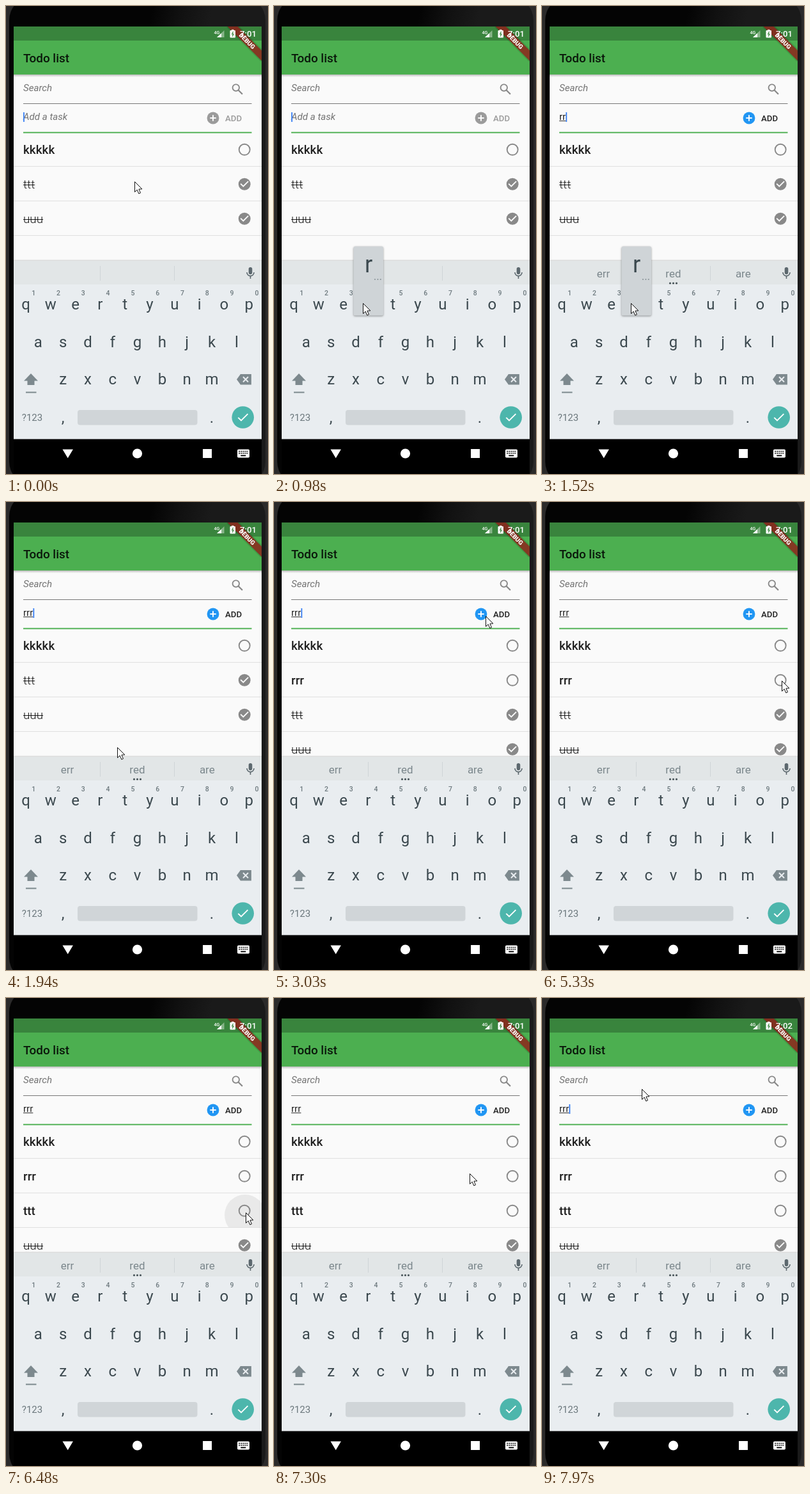
Recreate the animation shown at these times as an HTML page with a canvas. Size 410 by 731 pixels, loop 8 s.

```html
<!DOCTYPE html>
<html lang="en">
<head>
<meta charset="utf-8">
<title>Todo list</title>
<style>
html, body { margin: 0; width: 100%; height: 100%; overflow: hidden; background: #000; }
canvas { display: block; width: 410px; height: 731px; }
</style>
</head>
<body>
<canvas id="stage" width="410" height="731"></canvas>
<script>
const ctx = document.getElementById('stage').getContext('2d');
const LOOP = 8000, STEP = 137.3, LEAD = 30;
const DP = .944;
const LEFT = 12, WIDE = 388, MARGIN = 27, FIELD = 357.5;
const ROW = 54, KEY_X = 38.8, KEY_Y = 58.8;
const INK = 'rgba(0,0,0,.87)', HINT = 'rgba(0,0,0,.54)', ICON = '#898989', OFF = '#9b9b9b';
const GREEN = '#4caf50', STATUS = '#39843d', PAPER = '#fafafa';
const KEY = '#3b484e', KEY_ICON = '#7d898e', BOARD = '#e9edf0';

// Steps at which things happen
const TYPED = [8, 10, 12], ADDED = 21, UNCHECKED = 46, NEXT_MINUTE = 55;

// Each pointer move eases to a place and rests there
const home = { x: 201, y: 274 };
const moves = [
  { from: 0, to: 5, x: 147, y: 487 },
  { from: 5, to: 7, x: 139, y: 464 },
  { from: 12, to: 14, x: 174, y: 383 },
  { from: 14, to: 17, x: 337, y: 201 },
  { from: 17, to: 19, x: 331, y: 178 },
  { from: 24, to: 28, x: 318, y: 294 },
  { from: 28, to: 29, x: 381, y: 281 },
  { from: 30, to: 39, x: 375, y: 279 },
  { from: 39, to: 42, x: 375, y: 335 },
  { from: 50, to: 58, x: 156, y: 142 }
];

const clamp = v => Math.min(1, Math.max(0, v));
const ease = f => f * f * (3 - 2 * f);

function pointerAt(step) {
  return moves.reduce((p, m) => {
    const f = ease(clamp((step - m.from) / (m.to - m.from)));
    return { x: p.x + (m.x - p.x) * f, y: p.y + (m.y - p.y) * f };
  }, home);
}

function rect(x, y, w, h, color) {
  ctx.fillStyle = color;
  ctx.fillRect(x, y, w, h);
}

function round(x, y, w, h, r, color) {
  ctx.fillStyle = color;
  ctx.beginPath();
  ctx.roundRect(x, y, w, h, r);
  ctx.fill();
}

function disc(x, y, r, color) {
  ctx.fillStyle = color;
  ctx.beginPath();
  ctx.arc(x, y, r, 0, Math.PI * 2);
  ctx.fill();
}

function arc(x, y, r, width, color, end = Math.PI * 2) {
  ctx.strokeStyle = color;
  ctx.lineWidth = width;
  ctx.beginPath();
  ctx.arc(x, y, r, 0, end);
  ctx.stroke();
}

function poly(points, color) {
  ctx.beginPath();
  points.forEach(p => ctx.lineTo(...p));
  ctx.closePath();
  ctx.fillStyle = color;
  ctx.fill();
}

function line(points, width, color) {
  ctx.beginPath();
  points.forEach(p => ctx.lineTo(...p));
  ctx.lineWidth = width;
  ctx.strokeStyle = color;
  ctx.stroke();
}

// Isosceles triangle on a level base; a negative height points down
function triangle(cx, base, w, h, color) {
  poly([[cx - w / 2, base], [cx + w / 2, base], [cx, base - h]], color);
}

// Check mark around its lower corner, with 45° legs
function check(x, y, short, long, color) {
  line([[x - short, y - short], [x, y], [x + long, y - long]], 1.9, color);
}

function dots(cx, y, gap, r, color) {
  for (let i = -1; i <= 1; i++) disc(cx + i * gap, y, r, color);
}

function text(str, x, y, size, color, style = '400', align = 'left') {
  ctx.font = `${style} ${size}px Roboto, sans-serif`;
  ctx.textAlign = align;
  ctx.fillStyle = color;
  ctx.fillText(str, x, y);
  return ctx.measureText(str).width;
}

function spread(items, x, y, gap, size, color, style = '400') {
  [...items].forEach((item, i) => text(item, x + i * gap, y, size, color, style, 'center'));
}

function fade(x0, y0, x1, y1, ...colors) {
  const g = ctx.createLinearGradient(x0, y0, x1, y1);
  colors.forEach((c, i) => g.addColorStop(i / (colors.length - 1), c));
  return g;
}

function clipTo(x, y, w, h, drawInside) {
  ctx.save();
  ctx.beginPath();
  ctx.rect(x, y, w, h);
  ctx.clip();
  drawInside();
  ctx.restore();
}

function drawPhone() {
  rect(0, 0, 410, 731, '#2b2a2a');
  round(5, -14, 401, 762, 36, fade(230, 0, 320, 20, '#040404', '#111', '#1a1a1a'));
  rect(LEFT, 32, WIDE, 645, PAPER);
}

function drawRibbon() {
  ctx.translate(LEFT + WIDE, 32);
  ctx.scale(DP, DP);
  ctx.rotate(Math.PI / 4);
  rect(-40, 26, 80, 16, 'rgba(0,0,0,.12)');
  rect(-40, 28, 80, 12, 'rgba(0,0,0,.3)');
  rect(-40, 28, 80, 12, 'rgba(183,28,28,.63)');
  text('DEBUG', 0, 37.6, 10.2, '#fff', '900', 'center');
}

function drawStatus(step) {
  text('4G', 325.5, 44, 7, '#fff', '500');
  poly([[341.5, 38], [341.5, 49], [330, 49]], 'rgba(255,255,255,.4)');
  poly([[337, 42.5], [337, 49], [330, 49]], '#fff');
  round(350.5, 38, 8.5, 11.5, 1, '#fff');
  rect(353, 36.8, 3.5, 2, '#fff');
  line([[355.5, 40], [353.7, 43.8], [356, 43.8], [354.2, 47.5]], 1.2, STATUS);
  text(step < NEXT_MINUTE ? '7:01' : '7:02', 392, 48, 13.2, '#fff', '500', 'right');
}

function drawHeader(step) {
  rect(LEFT, 107, WIDE, 4, fade(0, 107, 0, 111, 'rgba(0,0,0,.25)', 'rgba(0,0,0,0)'));
  rect(LEFT, 54, WIDE, 53, GREEN);
  rect(LEFT, 32, WIDE, 22, STATUS);
  text('Todo list', MARGIN, 88, 20 * DP, INK, '500');
  clipTo(LEFT, 32, WIDE, 75, drawRibbon);
  drawStatus(step);
}

function drawFields(step, typed, caretOn) {
  text('Search', MARGIN, 133, 16 * DP, HINT, 'italic 400');
  arc(359.8, 127.6, 5.2, 1.9, ICON);
  line([[363.5, 131.3], [370, 137.8]], 2.2, ICON);
  rect(MARGIN, 152, FIELD, 1, '#777');

  let caretX = MARGIN;
  if (typed) {
    const w = text(typed, MARGIN, 177.6, 16 * DP, INK);
    rect(MARGIN, 179, w, .9, INK);
    caretX += w;
  } else {
    text('Add a task', MARGIN, 178, 16 * DP, HINT, 'italic 400');
  }
  if (caretOn) rect(caretX, 166, 1.9, 15, '#4285f4');
  rect(MARGIN, 196.7, FIELD, 1.9, GREEN);

  disc(324, 175, 10 * DP, step < TYPED[0] ? OFF : '#2196f3');
  rect(319.3, 174, 9.4, 1.9, '#fff');
  rect(323, 170.3, 1.9, 9.4, '#fff');
  text('ADD', 343, 180, 14 * DP, step <= TYPED[0] ? OFF : INK, '500');
}

function drawRow(label, done, index) {
  const x = 373.2, cy = 224.3 + index * ROW;
  const w = text(label, MARGIN, cy + 6.7, 20 * DP, INK, done ? '300' : '500');
  if (done) {
    rect(MARGIN, cy + .7, w, 1, INK);
    disc(x, cy, 10 * DP, ICON);
    check(x - 1.9, cy + 3.4, 4.1, 7.8, PAPER);
  } else {
    arc(x, cy, 9 * DP, 1.9, ICON);
  }
  rect(LEFT, 250 + index * ROW, WIDE, 1, '#e0e0e0');
}

function drawRipple(step) {
  const age = step - UNCHECKED + 1;
  if (age < 0) return;
  const alpha = .065 * clamp((5 - age) / 2);
  clipTo(LEFT, 305, WIDE, 53, () =>
    disc(374, 339, Math.min(32, 14 + age * 9), `rgba(0,0,0,${alpha})`));
}

function drawList(step) {
  const rows = [['kkkkk', false], ['ttt', step < UNCHECKED], ['uuu', true]];
  if (step >= ADDED) rows.splice(1, 0, ['rrr', false]);
  clipTo(LEFT, 199, WIDE, 199, () => {
    drawRipple(step);
    rows.forEach(([label, done], i) => drawRow(label, done, i));
  });
}

function drawSuggestions(step) {
  const mic = '#5c686e';
  rect(LEFT, 396, WIDE, 2, fade(0, 396, 0, 398, 'rgba(0,0,0,.03)', 'rgba(0,0,0,.15)'));
  rect(LEFT, 398, WIDE, 37, '#e2e6e7');
  [147, 263].forEach(x => rect(x, 406, 1, 23, '#cfd5d7'));
  if (step >= TYPED[0]) {
    spread(['err', 'red', 'are'], 96, 424, 109.4, 18 * DP, '#7b878c');
    dots(205.5, 433, 5, 1.6, '#455157');
  }
  round(379.7, 408, 5.6, 11, 2.8, mic);
  arc(382.5, 416, 5.6, 1.6, mic, Math.PI);
  rect(381.7, 421, 1.6, 5, mic);
}

function drawKeyboard() {
  rect(LEFT, 435, WIDE, 242, BOARD);
  ['qwertyuiop', 'asdfghjkl', 'zxcvbnm'].forEach((keys, i) =>
    spread(keys, 31 + KEY_X * [0, .5, 1.5][i], 473.8 + KEY_Y * i, KEY_X, 24, KEY));
  spread('1234567890', 43.2, 452, KEY_X, 10.5, '#6d797e', '500');

  triangle(39, 585.5, 22, 11.5, KEY_ICON);
  rect(33.5, 585, 11, 7, KEY_ICON);
  rect(31, 602.5, 16.5, 2, KEY_ICON);

  poly([[361, 583.2], [367, 575], [367, 591.5]], KEY_ICON);
  rect(366.9, 575, 17, 16.5, KEY_ICON);
  [-4, 4].forEach(d => line([[375 - d, 579.2], [375 + d, 587.2]], 2, BOARD));

  text('?123', 41, 648, 15, '#6b777c', '400', 'center');
  spread(',.', 89, 651, KEY_X * 6, 24, KEY);
  round(112, 631, 187.5, 23.5, 4, '#d0d5d8');
  disc(370.7, 642.5, 17.3, '#4db6ac');
  check(368, 647.5, 4.7, 10.4, '#fff');
}

function drawNav() {
  rect(LEFT, 676.5, WIDE, 55, '#000');
  triangle(96.7, 692.5, 16.5, -13.8, '#fff');
  disc(205.5, 699, 7.6, '#fff');
  rect(308, 692, 14, 14, '#fff');
  round(362, 692.5, 19, 13, 1.8, '#fff');
  for (let i = 0; i < 10; i++)
    rect(364.3 + i % 5 * 3, 694.8 + Math.floor(i / 5) * 3, 1.7, 1.7, '#000');
  rect(367.3, 701.4, 8, 1.8, '#000');
}

function drawKeyPopup() {
  ctx.save();
  ctx.shadowColor = 'rgba(0,0,0,.4)';
  ctx.shadowBlur = 3;
  ctx.shadowOffsetY = 1;
  round(124.5, 375.5, 46.5, 108, 2.5, '#cfd4d7');
  ctx.restore();
  text('r', 148, 415.5, 36, KEY, '400', 'center');
  dots(162.4, 427, 4.4, 1.1, '#8b959a');
}

function drawPointer({ x, y }) {
  ctx.save();
  ctx.translate(Math.round(x) + .5, Math.round(y) + .5);
  poly([[0, 0], [0, 16], [3.7, 12.6], [6.3, 18.6], [9, 17.4], [6.4, 11.6], [11.4, 11.4]], '#fff');
  ctx.lineWidth = 1;
  ctx.strokeStyle = '#111';
  ctx.stroke();
  ctx.restore();
}

function draw(time) {
  const step = Math.floor((time + LEAD) / STEP);
  const typed = 'r'.repeat(TYPED.filter(s => step >= s).length);
  const typing = step >= TYPED[0] && step <= TYPED[2];
  const caretOn = typing || Math.floor((step * STEP - 1600) / 504) % 2 === 0;

  drawPhone();
  drawHeader(step);
  drawFields(step, typed, caretOn);
  drawList(step);
  drawSuggestions(step);
  drawKeyboard();
  drawNav();
  if (TYPED.includes(step + 1)) drawKeyPopup();
  drawPointer(pointerAt(step));
}

const start = performance.now();
function tick() {
  draw((performance.now() - start) % LOOP);
  requestAnimationFrame(tick);
}
tick();
</script>
</body>
</html>
```
